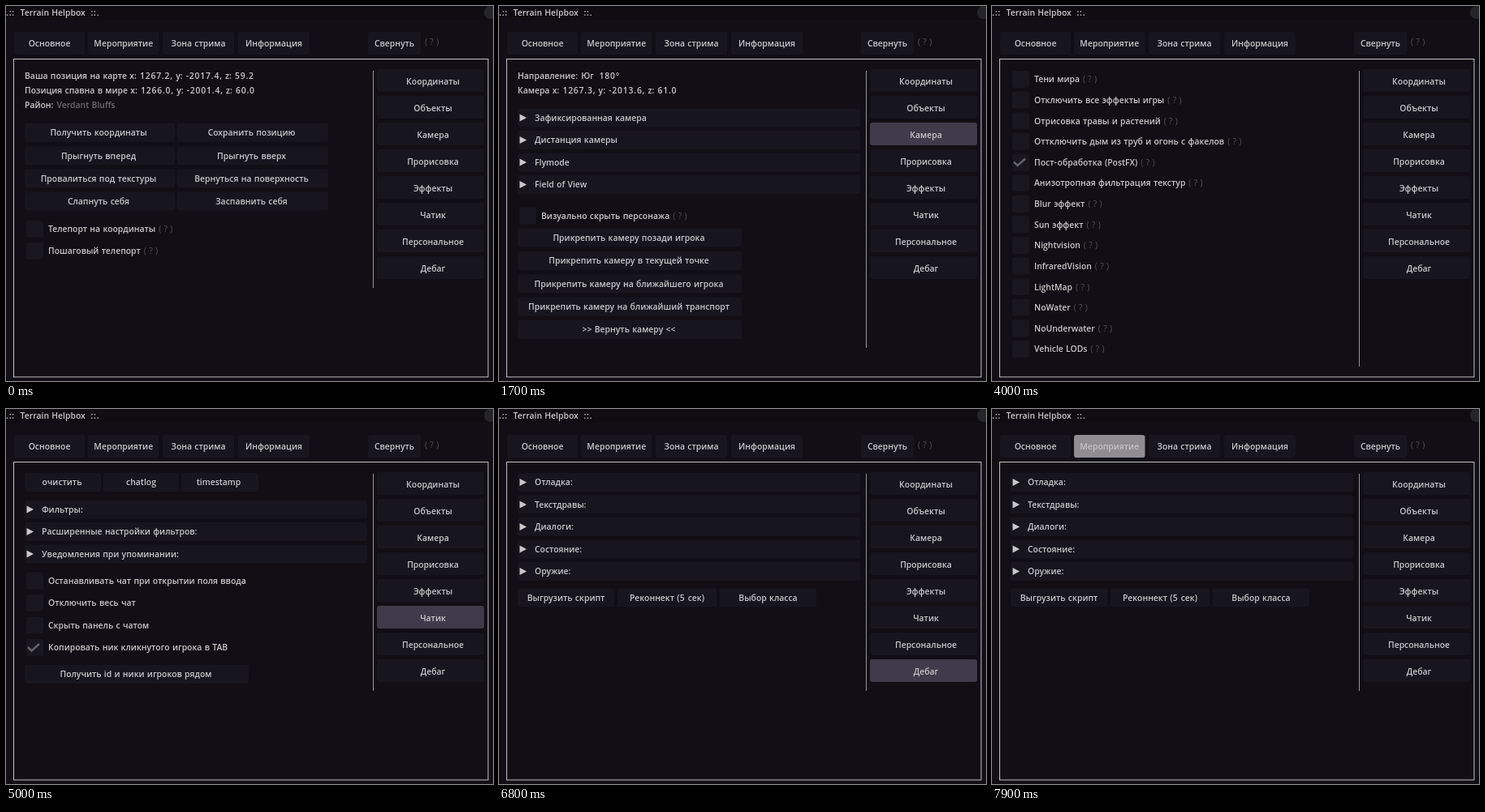
An HTML page for the animation above (8 s loop, 600x463 px).

```html
<!DOCTYPE html>
<html lang="ru">
<head>
<meta charset="utf-8">
<title>Terrain Helpbox</title>
<style>
html, body { margin: 0; width: 100%; height: 100%; overflow: hidden; background: #110f15; }
svg { display: block; width: 100%; height: 100%; }
text { font: 600 10.4px "Open Sans", "Noto Sans", sans-serif; word-spacing: .6px; fill: #c9c8cb; white-space: pre; }
.num { letter-spacing: .8px; }
.hint { font-weight: 400; fill: #515055; }
.dim { fill: #6b6a6f; }
.btn rect, .row { fill: #17151e; }
.box { fill: #18161f; }
.tick { fill: none; stroke: #626166; stroke-width: 2.6; }
.arrow { fill: #c9c8cb; }
.edge { fill: none; stroke: #c2c1c4; }
.divider { stroke: #98979b; }
.btn.hover rect { fill: #3f3b4a; }
.btn.press rect { fill: #8f8d92; }
.btn.press text { fill: #c3c2c6; }
</style>
</head>
<body>
<svg id="stage" viewBox="0 0 600 463"></svg>
<script>
const stage = document.getElementById('stage');
const LOOP = 8000;

function add(parent, tag, attrs, text) {
  const node = document.createElementNS('http://www.w3.org/2000/svg', tag);
  for (const key in attrs) node.setAttribute(key, attrs[key]);
  if (text) node.textContent = text;
  parent.append(node);
  return node;
}

// y is the middle of the line of text; digits and punctuation are set wider
function label(parent, x, y, text, anchor = 'start') {
  const line = add(parent, 'text', { x, y: y + 3.8, 'text-anchor': anchor });
  text.split(/([\d.,:°-]+)/).forEach((run, i) => {
    if (run) add(line, 'tspan', { class: i % 2 ? 'num' : '' }, run);
  });
  return line;
}

const rect = (parent, x, y, width, height, cls, rx = 3) =>
  add(parent, 'rect', { x, y, width, height, rx, class: cls });

function button(parent, x1, x2, y, text, { height = 23, center = (x1 + x2) / 2, textY = y } = {}) {
  const group = add(parent, 'g', { class: 'btn' });
  rect(group, x1, y - height / 2, x2 - x1, height, '');
  label(group, center, textY, text, 'middle');
  return group;
}

function foldout(parent, y, text) {
  rect(parent, 23, y - 11.5, 422, 23, 'row');
  add(parent, 'path', { d: `M25.5 ${y - 4.5}l8.5 4.5l-8.5 4.5z`, class: 'arrow' });
  label(parent, 44, y, text);
}

function checkbox(parent, y, text, { hint = true, checked = false } = {}) {
  rect(parent, 25, y - 10.5, 21, 21, 'box');
  if (checked) add(parent, 'path', { d: `M27 ${y - .5}l4.5 4.5l9.5 -8.5`, class: 'tick' });
  const line = label(parent, 52, y, text);
  if (hint) add(line, 'tspan', { dx: 4, class: 'hint' }, '( ? )');
}

function page(lineEnd, build) {
  const group = add(stage, 'g', { display: 'none' });
  add(group, 'path', { d: `M452.5 80V${lineEnd}`, class: 'divider' });
  if (build) build(group);
  return group;
}

// Window frame
rect(stage, 0, 0, 600, 463, '', 0).style.fill = '#110f15';
rect(stage, 0, 0, 600, 17, '', 0).style.fill = '#0f0d12';
label(stage, 0, 8, '.::  Terrain Helpbox  ::.');
add(stage, 'circle', { cx: 597, cy: 8, r: 8, fill: '#252428' });
rect(stage, 9.5, 65.5, 584.5, 392.5, 'edge', 0);

const controls = {};
[['Основное', 10, 97], ['Мероприятие', 101, 188.5], ['Зона стрима', 193, 281],
 ['Информация', 286, 374], ['Свернуть', 446, 511]].forEach(([text, x1, x2]) => {
  controls[text] = button(stage, x1, x2, 46, text, { height: 28 });
});
label(stage, 516, 44, '( ? )').setAttribute('class', 'hint');

['Координаты', 'Объекты', 'Камера', 'Прорисовка', 'Эффекты', 'Чатик', 'Персональное', 'Дебаг']
  .forEach((text, i) => {
    const y = 92 + 33 * i;
    controls[text] = button(stage, 457, 589, y, text, { height: 28, center: 526, textY: y + 1 });
  });

const pages = {
  'Координаты': page(348, g => {
    label(g, 23, 86, 'Ваша позиция на карте x: 1267.2, y: -2017.4, z: 59.2');
    label(g, 23, 104, 'Позиция спавна в мире x: 1266.0, y: -2001.4, z: 60.0');
    add(label(g, 23, 122, 'Район: '), 'tspan', { class: 'dim' }, 'Verdant Bluffs');
    [['Получить координаты', 'Сохранить позицию'],
     ['Прыгнуть вперед', 'Прыгнуть вверх'],
     ['Провалиться под текстуры', 'Вернуться на поверхность'],
     ['Слапнуть себя', 'Заспавнить себя']].forEach(([left, right], i) => {
      const y = 156.5 + 28.2 * i;
      button(g, 23, 208, y, left, { center: 114 });
      button(g, 211, 397, y, right, { center: 302.5 });
    });
    checkbox(g, 275, 'Телепорт на координаты');
    checkbox(g, 302.5, 'Пошаговый телепорт');
  }),
  'Объекты': page(429),
  'Камера': page(422, g => {
    label(g, 23, 86, 'Направление: Юг  180°');
    label(g, 23, 104, 'Камера x: 1267.3, y: -2013.6, z: 61.0');
    ['Зафиксированная камера', 'Дистанция камеры', 'Flymode', 'Field of View']
      .forEach((text, i) => foldout(g, 138 + 27.5 * i, text));
    checkbox(g, 259, 'Визуально скрыть персонажа');
    ['Прикрепить камеру позади игрока', 'Прикрепить камеру в текущей точке',
     'Прикрепить камеру на ближайшего игрока', 'Прикрепить камеру на ближайший транспорт',
     '>> Вернуть камеру <<'].forEach((text, i) => {
      button(g, 23, 299, 286 + 28.4 * i, text, { center: 160 });
    });
  }),
  'Прорисовка': page(348),
  'Эффекты': page(445, g => {
    ['Тени мира', 'Отключить все эффекты игры', 'Отрисовка травы и растений',
     'Оттключить дым из труб и огонь с факелов', 'Пост-обработка (PostFX)',
     'Анизотропная фильтрация текстур', 'Blur эффект', 'Sun эффект', 'Nightvision',
     'InfraredVision', 'LightMap', 'NoWater', 'NoUnderwater', 'Vehicle LODs']
      .forEach((text, i) => checkbox(g, 90.5 + 25.62 * i, text, { checked: i === 4 }));
  }),
  'Чатик': page(348, g => {
    button(g, 23, 117, 90.5, 'очистить', { center: 69 });
    button(g, 120, 213, 90.5, 'chatlog');
    button(g, 216, 311, 90.5, 'timestamp', { center: 262 });
    ['Фильтры:', 'Расширенные настройки фильтров:', 'Уведомления при упоминании:']
      .forEach((text, i) => foldout(g, 124 + 27.5 * i, text));
    ['Останавливать чат при открытии поля ввода', 'Отключить весь чат',
     'Скрыть панель с чатом', 'Копировать ник кликнутого игрока в TAB']
      .forEach((text, i) => checkbox(g, 212 + 27.5 * i, text, { hint: false, checked: i === 3 }));
    button(g, 23, 299, 327.5, 'Получить id и ники игроков рядом', { center: 160 });
  }),
  'Персональное': page(348),
  'Дебаг': page(348, g => {
    ['Отладка:', 'Текстдравы:', 'Диалоги:', 'Состояние:', 'Оружие:']
      .forEach((text, i) => foldout(g, 90.5 + 27.5 * i, text));
    button(g, 23, 142, 233, 'Выгрузить скрипт');
    button(g, 146, 268, 233, 'Реконнект (5 сек)');
    button(g, 272, 391, 233, 'Выбор класса');
  })
};

// Each visit: control, then the times of hover, press, release and leave
const visits = [
  ['Объекты', 300, 400, 500, 1300],
  ['Камера', 1400, 1600, 1700, 2400],
  ['Прорисовка', 2500, 2700, 2800, 3500],
  ['Эффекты', 3500, 3600, 3700, 4000],
  ['Чатик', 4200, 4400, 4500, 5300],
  ['Персональное', 5400, 5500, 5600, 6300],
  ['Дебаг', 6600, 6600, 6700, 7100],
  ['Мероприятие', 7800, 7900, LOOP, LOOP]
];

function draw(time) {
  let current = 'Координаты';
  for (const [name, hover, press, release, leave] of visits) {
    const pressed = time >= press && time < release;
    const state = pressed ? ' press' : time >= hover && time < leave ? ' hover' : '';
    controls[name].setAttribute('class', 'btn' + state);
    if (time >= release && pages[name]) current = name;
  }
  for (const name in pages) {
    pages[name].setAttribute('display', name === current ? 'inline' : 'none');
  }
}

const start = performance.now();
function tick() {
  draw((performance.now() - start) % LOOP);
  requestAnimationFrame(tick);
}
draw(0);
requestAnimationFrame(tick);
</script>
</body>
</html>
```
